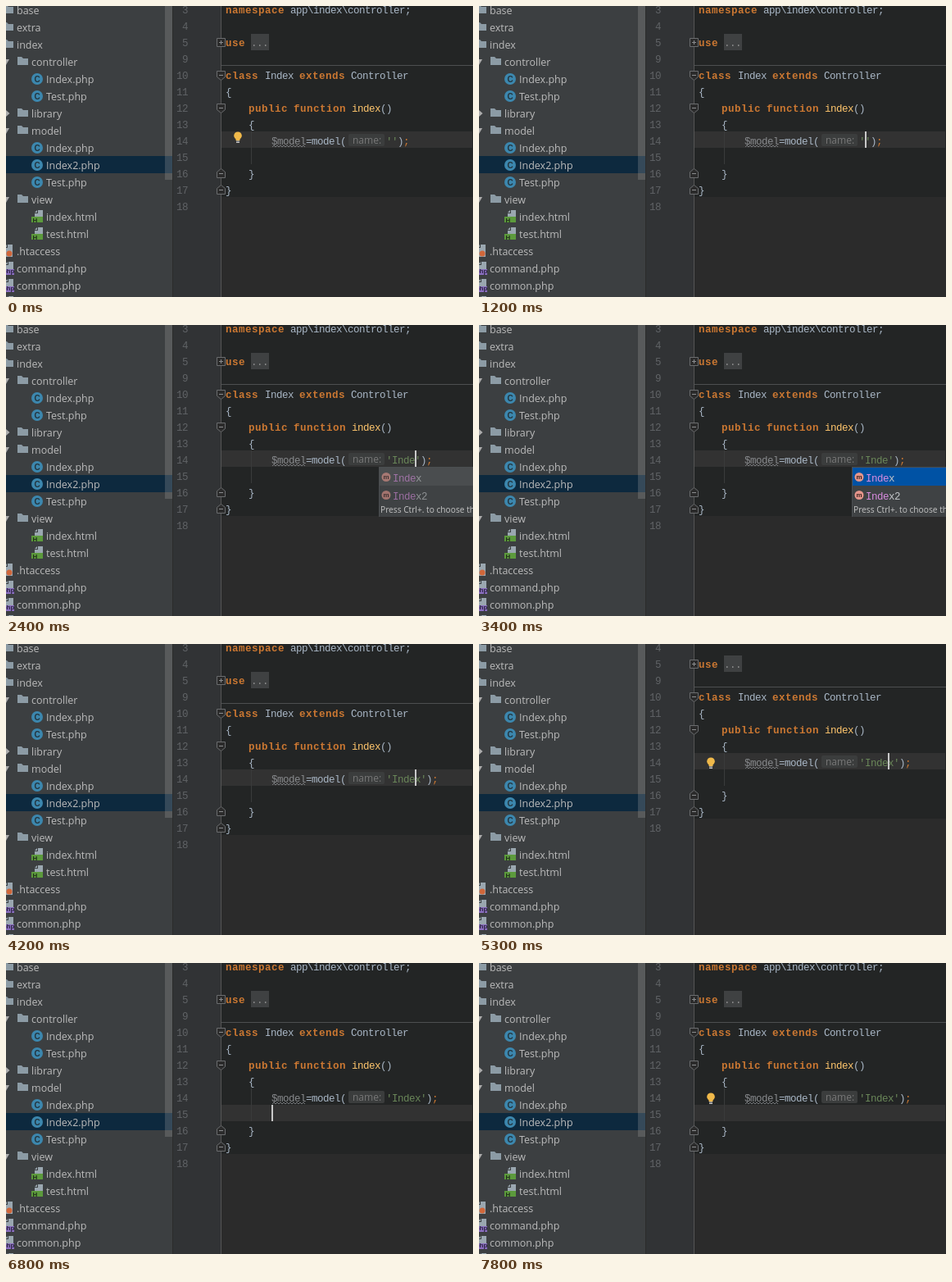
An HTML page that plays this animation: 570 by 355 pixels, repeating every 8000 ms.

```html
<!DOCTYPE html>
<html lang="en">
<head>
<meta charset="utf-8">
<title>Code completion</title>
<style>
html, body { margin: 0; width: 100%; height: 100%; overflow: hidden; background: #2b2b2b; }
svg { display: block; width: 570px; height: 355px; }
text { white-space: pre; }
.tree { font: 12.5px "Open Sans", "Noto Sans", sans-serif; fill: #bbbbbb; }
.code { font: 12.5px "Liberation Mono", monospace; letter-spacing: -.5px; }
.bold { font-weight: bold; letter-spacing: .5px; }
.hint { font: 12px "Open Sans", sans-serif; fill: #787878; }
.foot { font: 10.2px "Open Sans", sans-serif; fill: #c4c4c4; }
.tag { font: bold 8px "Liberation Sans", sans-serif; text-anchor: middle; }
</style>
</head>
<body>
<svg id="stage" viewBox="0 0 570 355"></svg>
<script>
const LOOP = 8000;
const PLAIN = '#a9b7c6', KEYWORD = '#cc7832', STRING = '#6a8759', NAME = '#ffc66d';
const stage = document.getElementById('stage');

function add(parent, tag, attrs, text) {
  const el = document.createElementNS('http://www.w3.org/2000/svg', tag);
  for (const key in attrs) el.setAttribute(key, attrs[key]);
  if (text !== undefined) el.textContent = text;
  return parent.appendChild(el);
}
const group = parent => add(parent, 'g', {});
const rect = (parent, x, y, width, height, fill, rx = 0) =>
  add(parent, 'rect', { x, y, width, height, fill, rx });
const path = (parent, d, fill, stroke = 'none') => add(parent, 'path', { d, fill, stroke });
const circle = (parent, cx, cy, r, fill) => add(parent, 'circle', { cx, cy, r, fill });
const label = (parent, x, y, text, cls, fill) =>
  add(parent, 'text', fill ? { x, y, class: cls, fill } : { x, y, class: cls }, text);
const show = (el, on) => el.setAttribute('visibility', on ? 'inherit' : 'hidden');

// Top edge of a numbered line; lines 6 to 8 are folded away.
const lineTop = n => 153 + (n < 6 ? n - 11 : n - 14) * 20;

// ---- project tree ----
const tree = group(stage);
rect(tree, 0, 0, 203, 355, '#3c3f41');
rect(tree, 0, 183, 203, 21, '#0d293e');
rect(tree, 194, 0, 9, 212, 'rgba(166, 166, 166, .26)');

function page(x, y) {
  path(tree, `M${x + 4} ${y - 8}h6v15h-10v-11h4z`, '#9aa7b0');
  path(tree, `M${x} ${y - 5}l3 -3v3z`, '#9aa7b0');
}
const icons = {
  folder(x, y) {
    path(tree, `M${x} ${y - 6}h5l2 2h6v8h-13z`, '#8c9ba5');
  },
  cls(x, y) {
    circle(tree, x + 7, y, 7, '#3c87ae');
    label(tree, x + 7, y + 3.5, 'C', 'tag', '#23343d').style.fontSize = '10px';
  },
  html(x, y) {
    page(x + 4, y);
    rect(tree, x, y, 14, 7, '#5c9a3c');
    label(tree, x + 4.5, y + 6.5, 'H', 'tag', '#20301a');
  },
  conf(x, y) {
    page(x - 2, y);
    circle(tree, x + 4, y + 3, 3.5, '#d0673a');
  },
  php(x, y) {
    page(x - 1, y);
    rect(tree, x - 4, y + 1, 14, 7, '#8b6fc0');
    label(tree, x + 3, y + 6, 'php', 'tag', '#2c2540');
  }
};
const rows = [
  ['base', 13, 'folder'], ['extra', 13, 'folder'], ['index', 13, 'folder'],
  ['controller', 31, 'folder', 'open'], ['Index.php', 49, 'cls'], ['Test.php', 49, 'cls'],
  ['library', 31, 'folder', 'shut'], ['model', 31, 'folder', 'open'],
  ['Index.php', 49, 'cls'], ['Index2.php', 49, 'cls'], ['Test.php', 49, 'cls'],
  ['view', 31, 'folder', 'open'], ['index.html', 49, 'html'], ['test.html', 49, 'html'],
  ['.htaccess', 13, 'conf'], ['command.php', 13, 'php'], ['common.php', 13, 'php'],
  ['config.php', 13, 'php']
];
rows.forEach(([name, x, icon, arrow], i) => {
  const y = 5 + i * 21;
  const inset = { folder: 17, conf: 13, php: 13 }[icon] || 18;
  icons[icon](x - inset, y);
  if (arrow === 'open') path(tree, `M-4 ${y - 3}h8l-4 7z`, '#adadad');
  if (arrow === 'shut') path(tree, `M0 ${y - 4}l4.5 4l-4.5 4z`, '#adadad');
  label(tree, x, y + 4.5, name, 'tree');
});
rect(stage, 203, 0, 1, 355, '#2b2b2b');

// ---- editor ----
rect(stage, 204, 0, 59, 355, '#313335');
rect(stage, 263, 0, 307, 355, '#2b2b2b');
const editor = group(stage);
rect(editor, 263, -20, 307, 253, '#232525');
const rowBar = rect(editor, 263, 153, 306, 20, '#323232');
rect(editor, 263, 72, 307, 1, '#4d4f50');
rect(editor, 299, 153, 1, 40, '#393b3b');
rect(stage, 262, 0, 1, 355, '#555555');
const content = group(stage);

const code = (x, n, text, fill = PLAIN, bold = false) =>
  label(content, x, lineTop(n) + 16, text, bold ? 'code bold' : 'code', fill);
const keyword = (x, n, text) => code(x, n, text, KEYWORD, true);

for (let n = 3; n <= 18; n++)
  if (n < 6 || n > 8) code(n < 10 ? 215 : 208, n, n, '#606366');

function fold(n, kind) {
  const y = lineTop(n) + 12;
  const shapes = {
    plus: `M257.5 ${y - 5.5}h10v10h-10z`,
    down: `M257.5 ${y - 5.5}h10v7l-5 4l-5 -4z`,
    up: `M257.5 ${y + 4.5}h10v-7l-5 -4l-5 4z`
  };
  path(content, shapes[kind], '#2b2b2b', '#6b6d6f');
  path(content, `M260 ${y - .5}h5` + (kind === 'plus' ? 'm-2.5 -2.5v5' : ''), 'none', '#8a8c8e');
}
fold(5, 'plus');
fold(10, 'down');
fold(12, 'down');
fold(16, 'up');
fold(17, 'up');

const braces = group(content);
rect(braces, 296, lineTop(13) + 2, 7, 17, '#3b514d');
rect(braces, 296, lineTop(16) + 2, 7, 17, '#3b514d');
const scope = rect(content, 252, 133, 1, 80, '#6b6d6f');

keyword(268, 3, 'namespace');
code(347, 3, 'app\\index\\controller;');
keyword(268, 5, 'use');
rect(content, 299, 34, 22, 20, '#3f4142');
code(299, 5, '...', '#8c8c8c');
keyword(268, 10, 'class');
code(316, 10, 'Index');
keyword(358, 10, 'extends');
code(421, 10, 'Controller');
code(268, 11, '{');
keyword(296, 12, 'public');
keyword(351, 12, 'function');
code(422, 12, 'index', NAME);
code(457, 12, '()');
code(296, 13, '{');
code(324, 14, '$model', '#87898c');
path(content, 'M325 172' + 'l2 -2l2 2'.repeat(10), 'none', '#77797c');
code(366, 14, '=model(');
rect(content, 418, 156, 44, 15, '#3b3d3d', 2);
label(content, 423, 168, 'name:', 'hint');
const quoted = code(464, 14, '', STRING);
const tail = code(478, 14, ')');
add(tail, 'tspan', { fill: KEYWORD }, ';');
code(296, 16, '}');
code(268, 17, '}');

const bulb = group(content);
circle(bulb, 283, 5.2, 4.8, '#f0b94a');
rect(bulb, 280.5, 8, 5, 3, '#f0b94a');
rect(bulb, 281, 11, 4, 1, '#8f8f8f');
rect(bulb, 281, 12.5, 4, 1.5, '#c4c4c4');
const caret = rect(content, 0, 0, 2, 20, '#c8c8c8');

// ---- completion popup ----
const popup = group(stage);
rect(popup, 455, 173, 116, 61, '#4b4e50');
rect(popup, 456, 174, 115, 60, '#3f4244');
const picked = rect(popup, 456, 174, 115, 22, '#0052a4');
label(popup, 457, 229, 'Press Ctrl+. to choose the selected item', 'foot');
const list = group(popup);
const items = ['Index', 'Index2'].map((word, i) => {
  const y = 186 + i * 22;
  circle(list, 464, y - .5, 5.5, '#e5958b');
  label(list, 464, y + 2, 'm', 'tag', '#3a2320');
  const line = label(list, 472, y + 5, '', 'code', '#c3c6c9');
  return { word, head: add(line, 'tspan', { fill: '#d98ce0' }), rest: add(line, 'tspan', {}) };
});

// Each step changes only what it names. caret is [x, line]; pick -1 means the list lacks focus.
const steps = [
  [0, { text: '', caret: null, row: 14, bulb: 153, popup: false, pick: -1, braces: false, scope: false, scroll: 0 }],
  [500, { row: 16, caret: [303, 16], bulb: 0, braces: true }],
  [800, { scope: true }],
  [1200, { row: 14, caret: [471, 14], braces: false, scope: false }],
  [1900, { bulb: 153 }],
  [2000, { bulb: 0, text: 'I', caret: [478, 14] }],
  [2100, { text: 'In', caret: [485, 14], popup: true }],
  [2300, { text: 'Ind', caret: [492, 14] }],
  [2400, { text: 'Inde', caret: [499, 14] }],
  [3000, { pick: 1 }],
  [3200, { caret: null }],
  [3400, { pick: 0 }],
  [3600, { text: 'Index', caret: [506, 14], popup: false, pick: -1 }],
  [4200, { caret: [499, 14] }],
  [4500, { scroll: 20 }],
  [5300, { bulb: 158 }],
  [5500, { scroll: 0, bulb: 0 }],
  [6000, { caret: [527, 14] }],
  [6400, { row: 15, caret: [269, 15] }],
  [6800, { caret: [324, 15] }],
  [7600, { bulb: 158 }],
  [7800, { caret: null }]
];

function render(s) {
  const shift = `translate(0 ${-s.scroll})`;
  editor.setAttribute('transform', shift);
  content.setAttribute('transform', shift);
  rowBar.setAttribute('y', lineTop(s.row));
  quoted.textContent = `'${s.text}'`;
  tail.setAttribute('x', 478 + s.text.length * 7);
  show(caret, s.caret);
  if (s.caret) {
    caret.setAttribute('x', s.caret[0]);
    caret.setAttribute('y', lineTop(s.caret[1]));
  }
  show(bulb, s.bulb);
  bulb.setAttribute('transform', `translate(0 ${s.bulb})`);
  show(braces, s.braces);
  show(scope, s.scope);
  show(popup, s.popup);
  const focused = s.pick >= 0;
  list.setAttribute('opacity', focused ? 1 : .6);
  picked.setAttribute('fill', focused ? '#0052a4' : '#4a4d4f');
  picked.setAttribute('y', 174 + Math.max(0, s.pick) * 22);
  for (const { word, head, rest } of items) {
    head.textContent = word.slice(0, s.text.length);
    rest.textContent = word.slice(s.text.length);
  }
}

const start = performance.now();
let last = -1;
function tick() {
  const t = Math.max(0, performance.now() - start) % LOOP;
  const past = steps.filter(([at]) => at <= t);
  if (past.length !== last) {
    last = past.length;
    render(Object.assign({}, ...past.map(step => step[1])));
  }
  requestAnimationFrame(tick);
}
tick();
</script>
</body>
</html>
```
